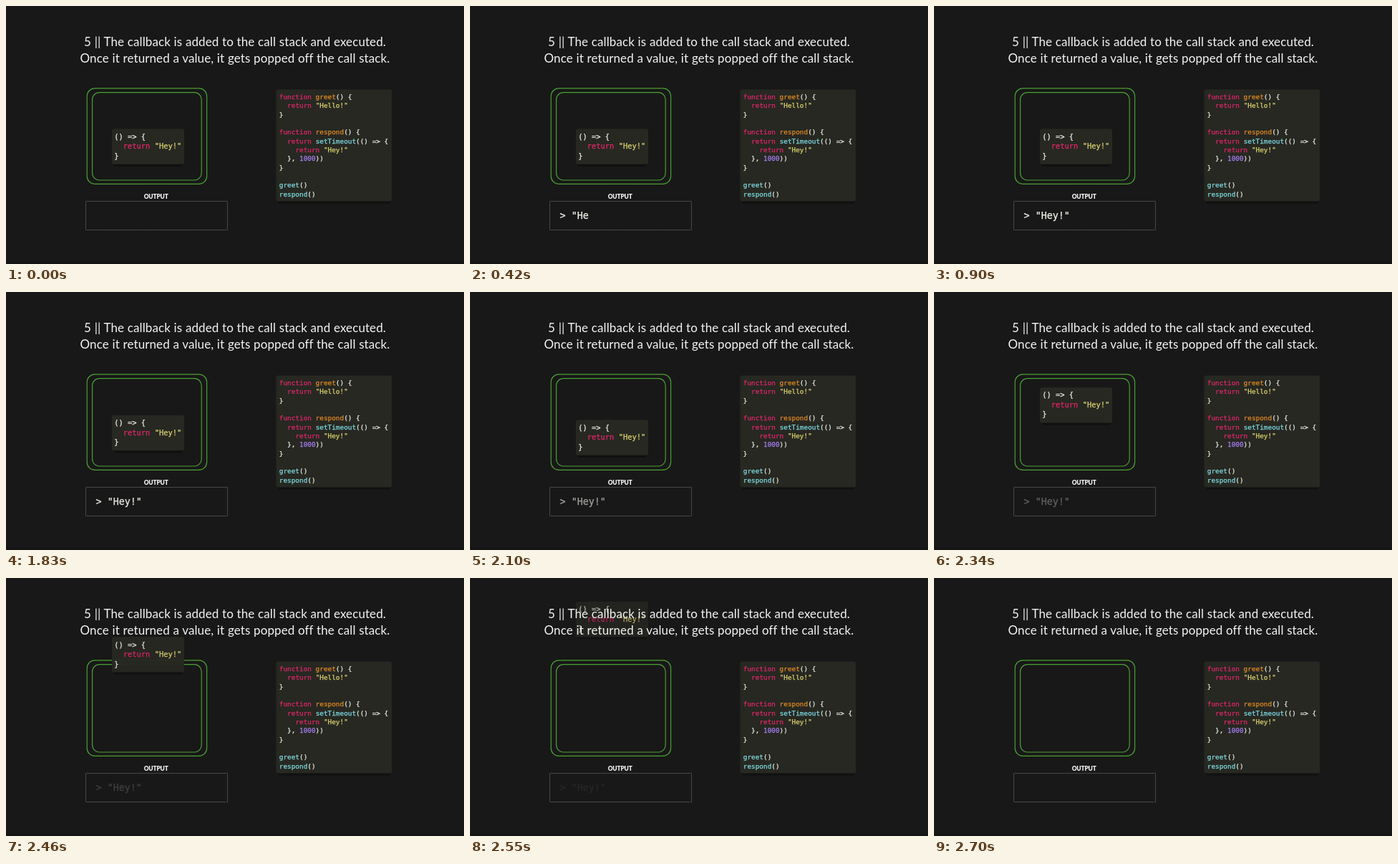
An HTML page that plays this animation: 640 px wide and 360 px high, repeating every 5.7 s.

```html
<!DOCTYPE html>
<html lang="en">
<head>
<meta charset="utf-8">
<title>Callback on the call stack</title>
<style>
html, body { margin: 0; width: 100%; height: 100%; overflow: hidden; background: #181818; }
svg { display: block; width: 640px; height: 360px; }
text { white-space: pre; fill: #f4f4f4; }
.title { font: 17px Lato, sans-serif; letter-spacing: .1px; word-spacing: .2px; text-anchor: middle; }
.label { font: 900 8.4px Lato, sans-serif; letter-spacing: -.15px; text-anchor: middle; }
.mono { font-family: "DejaVu Sans Mono", monospace; color: #f0f0ea; }
.mono, .mono tspan { fill: currentColor; stroke: currentColor; stroke-width: .25px; }
.code { font-size: 9.4px; }
.card { font-size: 10.4px; }
.out { font-size: 13.35px; }
.panel { fill: #272822; }
.shade { fill: #101010; }
.stack { fill: none; stroke: #4a9f32; stroke-width: 1.2; }
.k { color: #e0266a; }
.f { color: #e08a25; }
.s { color: #dcd26e; }
.c { color: #7fdbe2; }
.n { color: #a67ef0; }
</style>
</head>
<body>
<svg viewBox="0 0 640 360">
  <rect y="356" width="640" height="4" fill="#151515"/>

  <rect class="stack" x="113.2" y="114.8" width="167.4" height="133.6" rx="11"/>
  <rect class="stack" x="120.6" y="120.6" width="152.6" height="122.4" rx="10"/>

  <text class="label" x="209.7" y="269">OUTPUT</text>
  <rect x="111.5" y="272.5" width="198" height="40" fill="none" stroke="#777" stroke-dasharray="1 1" stroke-dashoffset=".5"/>
  <text class="mono out" id="out" x="125.6" y="297"></text>

  <rect class="shade" x="380" y="268" width="157" height="7.5" rx="3"/>
  <rect class="panel" x="377.5" y="116.5" width="161.5" height="156" rx="3"/>
  <g id="code"></g>

  <g id="card">
    <rect class="shade" x="151" y="216.3" width="95.5" height="7.7" rx="3"/>
    <rect class="panel" x="148" y="171.5" width="101" height="49.3" rx="3"/>
  </g>

  <text class="title" x="320" y="56">5 || The callback is added to the call stack and executed.</text>
  <text class="title" x="320" y="78.7">Once it returned a value, it gets popped off the call stack.</text>
</svg>
<script>
const LOOP = 5700, OUTPUT = '> "Hey!"';
const $ = id => document.getElementById(id);
const progress = (t, from, to) => Math.max(0, Math.min(1, (t - from) / (to - from)));

// Each token written as class:word| becomes a coloured tspan.
function addLines(group, cls, x, y, step, lines) {
  const rows = lines.map((line, i) => {
    const safe = line.replace(/>/g, '&gt;');
    const spans = safe.replace(/([kfscn]):([^|]+)\|/g, '<tspan class="$1">$2</tspan>');
    return `<text class="mono ${cls}" x="${x}" y="${y + i * step}">${spans}</text>`;
  });
  group.insertAdjacentHTML('beforeend', rows.join(''));
}

addLines($('code'), 'code', 381.8, 130, 12.33, [
  'k:function| f:greet|() {',
  '  k:return| s:"Hello!"|',
  '}',
  '',
  'k:function| f:respond|() {',
  '  k:return| c:setTimeout|(() => {',
  '    k:return| s:"Hey!"|',
  '  }, n:1000|))',
  '}',
  '',
  'c:greet|()',
  'c:respond|()'
]);
addLines($('card'), 'card', 151.3, 185.8, 13.5, [
  '() => {',
  '  k:return| s:"Hey!"|',
  '}'
]);

// Small dip, then a throw upwards; u counts 100 ms units.
const lift = u => u * u * (4.529 - 1.4633 * u + 0.07098 * u * u);

function draw(t) {
  // The space is typed together with the quote that follows it.
  const keys = Math.max(0, Math.floor((t - 55) / 115) + 1);
  $('out').textContent = OUTPUT.slice(0, keys > 1 ? keys + 1 : keys);
  $('out').setAttribute('opacity', 1 - progress(t, 1800, 2600));

  const card = $('card');
  card.setAttribute('transform', `translate(0 ${lift(9 * progress(t, 1800, 2700))})`);
  card.setAttribute('opacity', 1 - progress(t, 2400, 2700) ** 2);
}

const start = performance.now();
function tick() {
  draw((performance.now() - start) % LOOP);
  requestAnimationFrame(tick);
}
tick();
</script>
</body>
</html>
```
